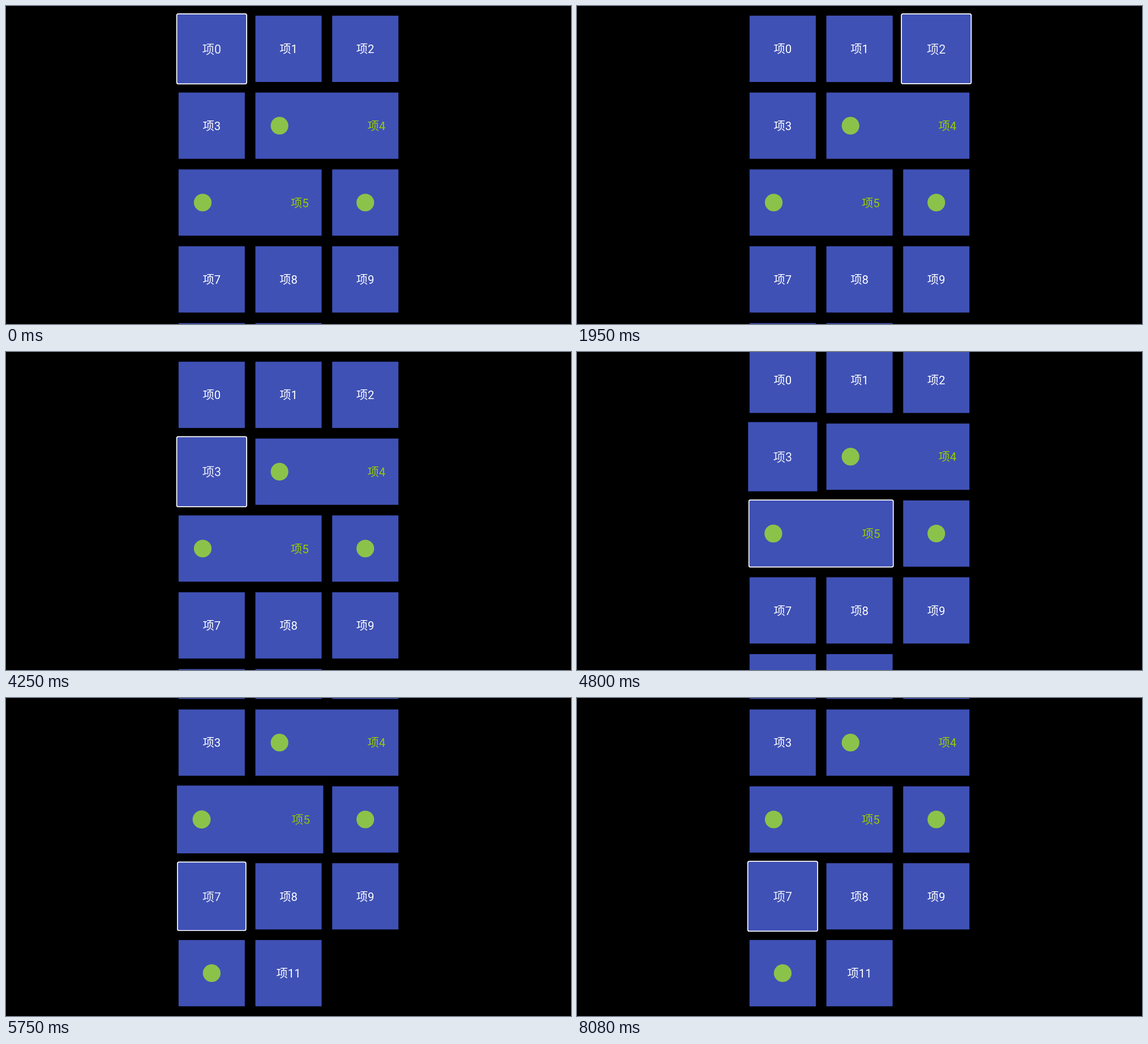
Write an HTML page that moves like this. It is 998 px wide and 561 px high and loops after 8.6 s.

```html
<!DOCTYPE html>
<html lang="zh-CN">
<head>
<meta charset="utf-8">
<title>Focus grid</title>
<style>
  html, body { margin: 0; width: 100%; height: 100%; overflow: hidden; background: #000; }
  svg { display: block; width: 998px; height: 561px; }
  .tile { fill: #3f51b5; }
  .ring { fill: none; stroke: #fff; stroke-width: 3.2; visibility: hidden; }
  .icon { fill: #8bc34a; }
  text { font: 39px Roboto, "Noto Sans CJK SC", "Noto Sans CJK", sans-serif; fill: #fff; text-anchor: middle; }
  .wide text { fill: #9c0; text-anchor: end; }
  .focus .ring { visibility: visible; }
  .zoomed text { fill-opacity: .9; }
</style>
</head>
<body>
<svg viewBox="0 0 1920 1080" preserveAspectRatio="none"><g id="grid"></g></svg>
<script>
const SIZE = 225, PITCH = 261, LEFT = 586.5, TOP = 33;
const VIEW = 1080, MAX_SCROLL = 255;
const ZOOM = 0.052, DURATION = 360, FRAME = 130, LOOP = 8600;
const grid = document.getElementById('grid');

function add(parent, name, attrs, text = '') {
  const el = document.createElementNS('http://www.w3.org/2000/svg', name);
  for (const key in attrs) el.setAttribute(key, attrs[key]);
  el.textContent = text;
  return parent.appendChild(el);
}

function addRect(parent, w, h, attrs) {
  add(parent, 'rect', { x: -w / 2, y: -h / 2, width: w, height: h, ...attrs });
}

// Each tile is drawn around its own centre so that it zooms in place.
let slot = 0;
const tiles = Array.from({ length: 12 }, (_, i) => {
  const wide = i === 4 || i === 5;
  const iconOnly = i === 6 || i === 10;
  const w = wide ? SIZE + PITCH : SIZE;
  const x = LEFT + slot % 3 * PITCH + w / 2;
  const y = TOP + Math.floor(slot / 3) * PITCH + SIZE / 2;
  slot += wide ? 2 : 1;

  const el = add(grid, 'g', { class: wide ? 'wide' : '' });
  addRect(el, w, SIZE, { class: 'tile' });
  if (wide || iconOnly) add(el, 'circle', { cx: wide ? 82 - w / 2 : 0, cy: 0, r: 30, class: 'icon' });
  if (!iconOnly) add(el, 'text', { x: wide ? w / 2 - 44 : 0, y: 15 }, '项' + i);
  addRect(el, w + 1, SIZE + 1, { rx: 5, class: 'ring' });
  return { el, x, y };
});

// Focus moves: when the change is first seen, how long it has run by then, and the new tile.
const moves = [
  [0, DURATION, 0], [690, 86, 1], [1950, 280, 2], [2900, 80, 4], [3980, 290, 3],
  [4800, 27, 5], [5750, 120, 7], [6670, 80, 10], [7720, 30, 7]
];

const clamp = (v, max) => Math.min(Math.max(v, 0), max);
const decelerate = x => 1 - (1 - clamp(x, 1)) ** 2;

// The list centres the focused row as far as its ends allow.
const scrollFor = i => clamp(tiles[i].y - VIEW / 2, MAX_SCROLL);

function draw(now) {
  const time = now % LOOP;
  const index = moves.findLastIndex(([seen]) => seen <= time);
  const [seen, lead, to] = moves[index];
  const from = index ? moves[index - 1][2] : to;

  // Motion advances in whole frames; scrolling runs three times as fast as the zoom.
  const elapsed = lead + Math.floor((time - seen) / FRAME) * FRAME;
  const zoom = decelerate(elapsed / DURATION);
  const slide = decelerate(3 * elapsed / DURATION);
  const scroll = scrollFor(from) + (scrollFor(to) - scrollFor(from)) * slide;

  grid.setAttribute('transform', `translate(0 ${-scroll})`);
  tiles.forEach(({ el, x, y }, i) => {
    const amount = i === to ? zoom : i === from ? 1 - zoom : 0;
    el.setAttribute('transform', `translate(${x} ${y}) scale(${1 + ZOOM * amount})`);
    el.classList.toggle('focus', i === to);
    el.classList.toggle('zoomed', amount > .2);
  });
  requestAnimationFrame(draw);
}
draw(0);
</script>
</body>
</html>
```
